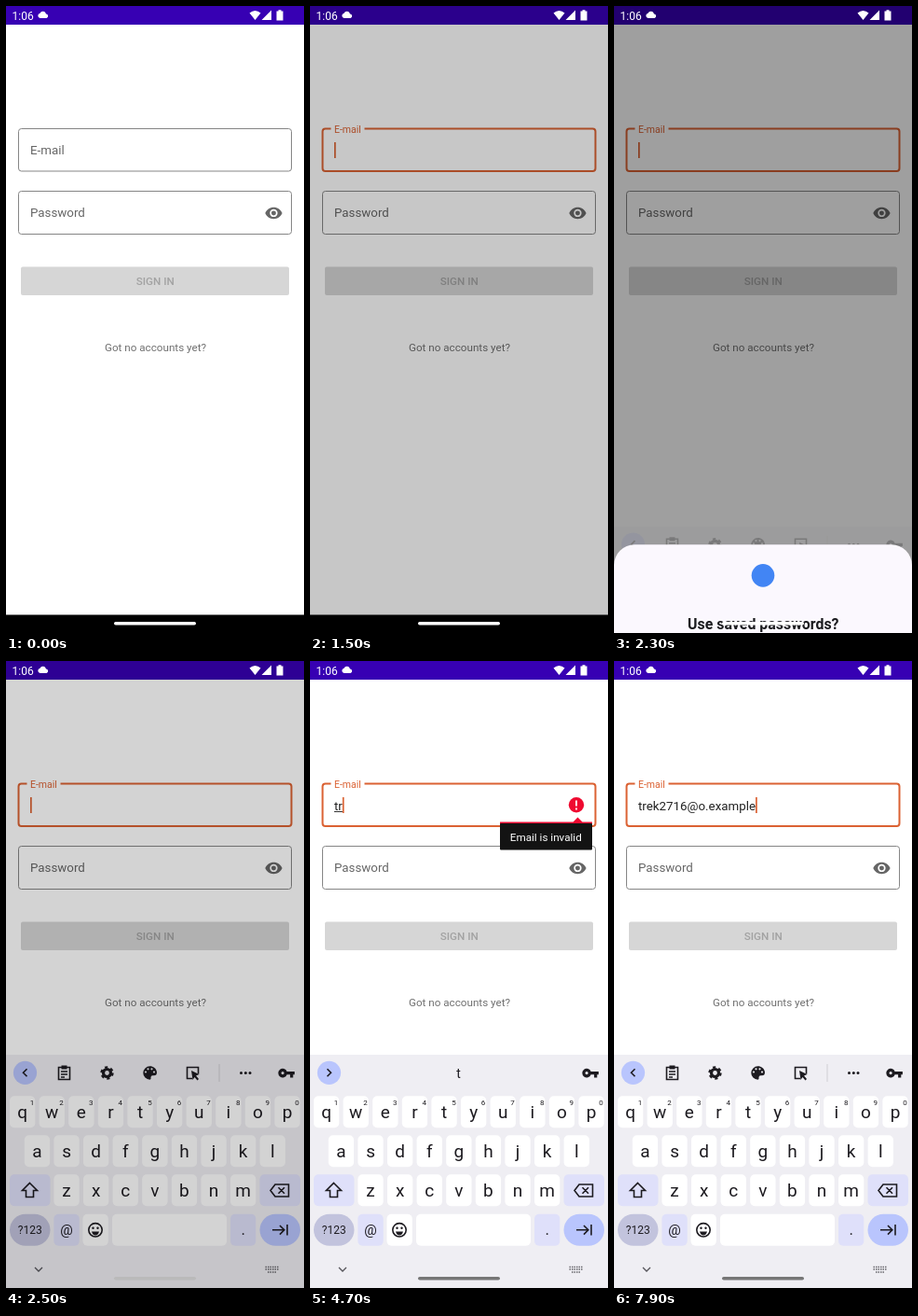
These frames come from a looping animation (320 px wide and 672 px high, 8000 ms). An HTML page:

```html
<!DOCTYPE html>
<html lang="en">
<head>
<meta charset="utf-8">
<title>Sign in</title>
<style>
html, body { margin: 0; width: 100%; height: 100%; overflow: hidden; background: #fff; }
svg { display: block; width: 100%; height: 100%; font: 11.67px Roboto, sans-serif; }
text { white-space: pre; }
.mid { text-anchor: middle; }
.line { fill: none; stroke: #1d1b20; stroke-width: 1.6; }
.key { font-size: 19px; text-anchor: middle; }
</style>
</head>
<body>
<svg viewBox="0 0 320 672">
  <rect width="320" height="672" fill="#fff"/>
  <rect width="320" height="20" fill="#3700b3"/>

  <g id="page">
    <rect id="box" x="13.5" y="131.5" width="293" height="45.5" rx="3" fill="none"/>
    <rect id="gap" x="22.5" y="129" height="6" fill="#fff"/>
    <text id="label" x="26">E-mail</text>
    <text id="typed" x="26" y="159.5" font-size="13.33" fill="#222"></text>
    <rect id="under" x="26" y="161" height="1" fill="#333"/>
    <rect id="caret" y="146" width="1.7" height="17" fill="#db6233"/>
    <rect x="13.5" y="198.5" width="293" height="46" rx="3" fill="none" stroke="#858585"/>
    <text x="26" y="226.3" font-size="13.33" fill="#666">Password</text>
    <path transform="translate(277.5 212) scale(.83)" fill="#666" d="M12 4.5C7 4.5 2.7 7.6 1 12c1.7 4.4 6 7.5 11 7.5s9.3-3.1 11-7.5c-1.7-4.4-6-7.5-11-7.5zM12 17a5 5 0 1 1 0-10 5 5 0 0 1 0 10zm0-8a3 3 0 1 0 0 6 3 3 0 0 0 0-6z"/>
    <rect x="16" y="279.5" width="288" height="30.5" rx="2" fill="#d6d6d6"/>
    <text class="mid" x="160.3" y="299.3" font-weight="500" fill="#a2a2a2">SIGN IN</text>
    <text class="mid" x="160.5" y="370.3" fill="#707070">Got no accounts yet?</text>
    <g id="error">
      <circle cx="286" cy="154.3" r="8.2" fill="#ef0a30"/>
      <path d="M286 149.5v6M286 157.5v2" stroke="#fff" stroke-width="1.9"/>
      <path d="M204 172.5h78.500l5-5 5 5H303v3H204z" fill="#ef0a30"/>
      <rect x="204" y="174" width="99" height="28.500" rx="1" fill="#131313"/>
      <text class="mid" x="253.3" y="193.3" fill="#fff">Email is invalid</text>
    </g>
  </g>

  <g id="board" fill="#1d1b20">
    <rect y="422" width="320" height="250" fill="#efeef3"/>
    <circle cx="20.5" cy="441.300" r="12.600" fill="#b9c5fd"/>
    <path id="arrow" class="line"/>
    <path transform="translate(291.500 432) scale(.8)" d="M12.650 10A6 6 0 1 0 12.650 14H17v4h4v-4h2v-4zM7 14a2 2 0 1 1 0-4 2 2 0 0 1 0 4z"/>
    <g id="tools">
      <path class="line" d="M56.500 435.500h12v13h-12zM59 440h7M59 443h7M59 446h4"/>
      <path d="M59.500 433.500h6v4h-6z"/>
      <circle class="line" cx="108.500" cy="441.500" r="4" style="stroke-width:3.200"/>
      <circle class="line" cx="108.500" cy="441.500" r="6" style="stroke-width:2.400" stroke-dasharray="3.140"/>
      <path d="M154.500 434.300a7.200 7.200 0 1 0 0 14.400q1.500-.5 1-2.500 0-2 2-2h1.500q3 0 3-3.500c-.5-4-4-6.400-7.500-6.400z"/>
      <g fill="#efeef3"><circle cx="150" cy="440.500" r="1.100"/><circle cx="152.500" cy="437.300" r="1.100"/><circle cx="156.500" cy="437.300" r="1.100"/><circle cx="159" cy="440.500" r="1.100"/></g>
      <path class="line" d="M200 447.500h-5.500v-12h12v7"/>
      <path d="M199 439l8.500 4-3.500 1.500 3 3.500-1.500 1.500-3-3.500-2 3z"/>
      <path d="M228.500 432h1v19h-1z" fill="#cfcdd4"/>
      <circle cx="252.500" cy="441.500" r="1.500"/><circle cx="257.300" cy="441.500" r="1.500"/><circle cx="262" cy="441.500" r="1.500"/>
    </g>
    <text id="single" class="mid" x="159.500" y="447" font-size="14"></text>
    <g id="triple" class="mid">
      <path d="M112.500 432h1v19h-1zM205 432h1v19h-1z" fill="#cfcdd4"/>
      <text id="guess" x="72" y="447.300" font-size="14"></text>
      <text x="159.500" y="436" font-weight="500" font-size="11.500">trek2716</text>
      <text x="159" y="450" font-size="10.500">@o.example</text>
      <text x="247" y="436" font-weight="500" font-size="11.500">trek264859</text>
      <text x="247" y="450" font-size="10.500">@o.example</text>
    </g>
    <g id="keys"></g>
    <path class="line" d="M25.500 559.500l8 8h-4v7h-8v-7h-4z"/>
    <path class="line" d="M284 567.500l5-6.500h14.500v13H289zM292.500 564.300l6.500 6.500M299 564.300l-6.500 6.500"/>
    <circle class="line" cx="96" cy="609.800" r="7.200"/>
    <path d="M92 611.500h8q-1 4-4 4t-4-4z"/><circle cx="93.500" cy="607.700" r="1.200"/><circle cx="98.500" cy="607.700" r="1.200"/>
    <path class="line" d="M286 609.800h12M294 605l4.800 4.800-4.800 4.800M302 604v11.600"/>
    <path class="line" style="stroke:#55545a;stroke-width:1.300" d="M31 650l4 4 4-4"/>
    <path class="line" style="stroke:#66656b;stroke-width:1.500" stroke-dasharray="1.500 1" d="M278.500 649.500h14M278.500 652h14M281 655h9"/>
  </g>

  <rect id="dim" width="320" height="672"/>

  <g id="sheet">
    <path d="M0 680V405a22 22 0 0 1 22-22H298a22 22 0 0 1 22 22V680z" fill="#fbf8fe"/>
    <circle cx="160" cy="416" r="12.300" fill="#4285f4"/>
    <g class="mid" fill="#1b1b1f">
      <text x="160.300" y="473.700" font-size="15.900" font-weight="700">Use saved passwords?</text>
      <text x="160" y="506" font-size="13" fill="#77767c">for NFerlo</text>
      <rect x="19.500" y="529.500" width="281" height="42.500" fill="#aeadae"/>
      <text x="32.500" y="555" style="text-anchor:start">dorna.velsonika@o.example</text>
      <rect x="19.500" y="604" width="78.500" height="29.500" rx="14.700" fill="none" stroke="#62668f"/>
      <text x="58.700" y="623.300">No thanks</text>
      <rect x="228" y="603.500" width="72.500" height="30.500" rx="15.200" fill="#dfe1fa"/>
      <text x="264.200" y="623.300">Continue</text>
    </g>
  </g>

  <g fill="#fff">
    <text x="6.500" y="14.600" font-size="12">1:06</text>
    <path d="M36.500 13a2.700 2.700 0 0 1 0-5.300 3.500 3.500 0 0 1 6.500 .8 2.300 2.300 0 0 1 .5 4.500z"/>
    <path d="M261.500 7.500q6-5 12 0l-6 7.500zM274.500 15l10.500-10.500V15z"/>
    <path d="M290.500 5.500h2v-1.200h3v1.200h2V15.500h-7z"/>
  </g>
  <rect id="nav" y="652.500" width="320" height="20"/>
  <rect id="pill" x="116" y="660" width="88" height="3.600" rx="1.800"/>
</svg>

<script>
const $ = id => document.getElementById(id);
const set = (id, attrs) => { for (const k in attrs) $(id).setAttribute(k, attrs[k]); };
const show = (id, on) => { $(id).style.display = on ? '' : 'none'; };
const ramp = (t, from, to) => Math.min(1, Math.max(0, (t - from) / (to - from)));
const mix = (a, b, p) => a + (b - a) * p;

// Keyboard
const PITCH = 31.6, PALE = '#dfe0fa';
let keys = '';
function key(x, y, w, fill = '#fff', text = '', size = 19, round = 5) {
  keys += `<rect x="${x}" y="${y}" width="${w}" height="34" rx="${round}" fill="${fill}"/>` +
    `<text class="key" x="${x + w / 2}" y="${y + 17 + size * .33}" style="font-size:${size}px">${text}</text>`;
}
[['qwertyuiop', 4, 466.3], ['asdfghjkl', 19.8, 508.3], ['zxcvbnm', 51.4, 550.3]].forEach(([row, x, y], r) =>
  [...row].forEach((c, i) => {
    key(x + i * PITCH, y, 27.3, '#fff', c);
    if (!r) keys += `<text class="mid" x="${x + i * PITCH + 24}" y="475.500" font-size="8">${(i + 1) % 10}</text>`;
  }));
key(4, 550.3, 43.5, PALE);
key(272.500, 550.3, 43.5, PALE);
key(4, 592.800, 43.5, '#c2c3dd', '?123', 12, 17);
key(51.4, 592.800, 27.3, PALE, '@', 15);
key(82.500, 592.800, 27.3);
key(114, 592.800, 123);
key(241, 592.800, 27.3, PALE, '.', 17);
key(272.500, 592.800, 43.5, '#b9c5fd', '', 12, 17);
$('keys').innerHTML = keys;

// Typing: "tt" is entered and erased, then the address follows
const address = 'trek2716@o.example';
const strokes = [[3300, 't'], [3500, 'tt'], [3900, 't'], [4100, '']];
[4600, 4700, 4900, 5000, 5300, 5500, 5750, 6000, 6400, 6500, 6700, 6800, 6900, 7100, 7300, 7600, 7700, 7900]
  .forEach((t, i) => strokes.push([t, address.slice(0, i + 1)]));
const textAt = t => strokes.reduce((s, [at, v]) => at <= t ? v : s, '');

function drawField(t) {
  const focus = ramp(t, 1000, 1170), on = focus > 0, color = on ? '#db6233' : '#666';
  set('box', { stroke: on ? color : '#858585', 'stroke-width': 1 + focus });
  set('gap', { width: 36 * focus });
  set('label', { y: mix(159.3, 136, focus), 'font-size': mix(13.33, 10.5, focus), fill: color });
  const text = textAt(t);
  $('typed').textContent = text;
  set('caret', { x: 26 + (text ? $('typed').getComputedTextLength() : 0) });
  show('caret', focus === 1);
  const marked = text.includes('@') ? 0 : Math.min(5, text.length);
  set('under', { width: marked ? $('typed').getSubStringLength(0, marked) : 0 });
  show('error', t >= 3300 && t < 7600);
}

function drawBoard(t) {
  const up = ramp(t, 2230, 2500);
  set('board', { transform: `translate(0 ${250 * (1 - up) ** 2})`, opacity: up });
  const word = textAt(t - 100), tools = !word || t >= 7100;
  const three = !tools && word.length >= 4 && word.length < 8;
  show('tools', tools);
  show('triple', three);
  show('single', !tools && !three);
  $('single').textContent = $('guess').textContent = word;
  set('arrow', { d: tools ? 'M22.500 437.300l-4 4 4 4' : 'M18.500 437.300l4 4-4 4' });
}

function drawSheet(t) {
  const rise = 1 - (1 - ramp(t, 1500, 1790)) ** 2;
  const fall = .5 - .5 * Math.cos(Math.PI * ramp(t, 2058, 2456));
  set('sheet', { transform: `translate(0 ${290 * (1 - rise + fall)})` });
  set('dim', { opacity: .58 * (ramp(t, 1310, 1810) - ramp(t, 2100, 2670)) });
  show('nav', t < 2058);
  const shade = t < 2058 ? mix(255, 170, ramp(t, 1550, 1800)) : mix(255, 118, ramp(t, 2350, 2650));
  set('pill', { fill: `rgb(${shade},${shade},${shade})` });
}

function frame() {
  const t = performance.now() % 8000;
  drawField(t);
  drawBoard(t);
  drawSheet(t);
  requestAnimationFrame(frame);
}
frame();
</script>
</body>
</html>
```
